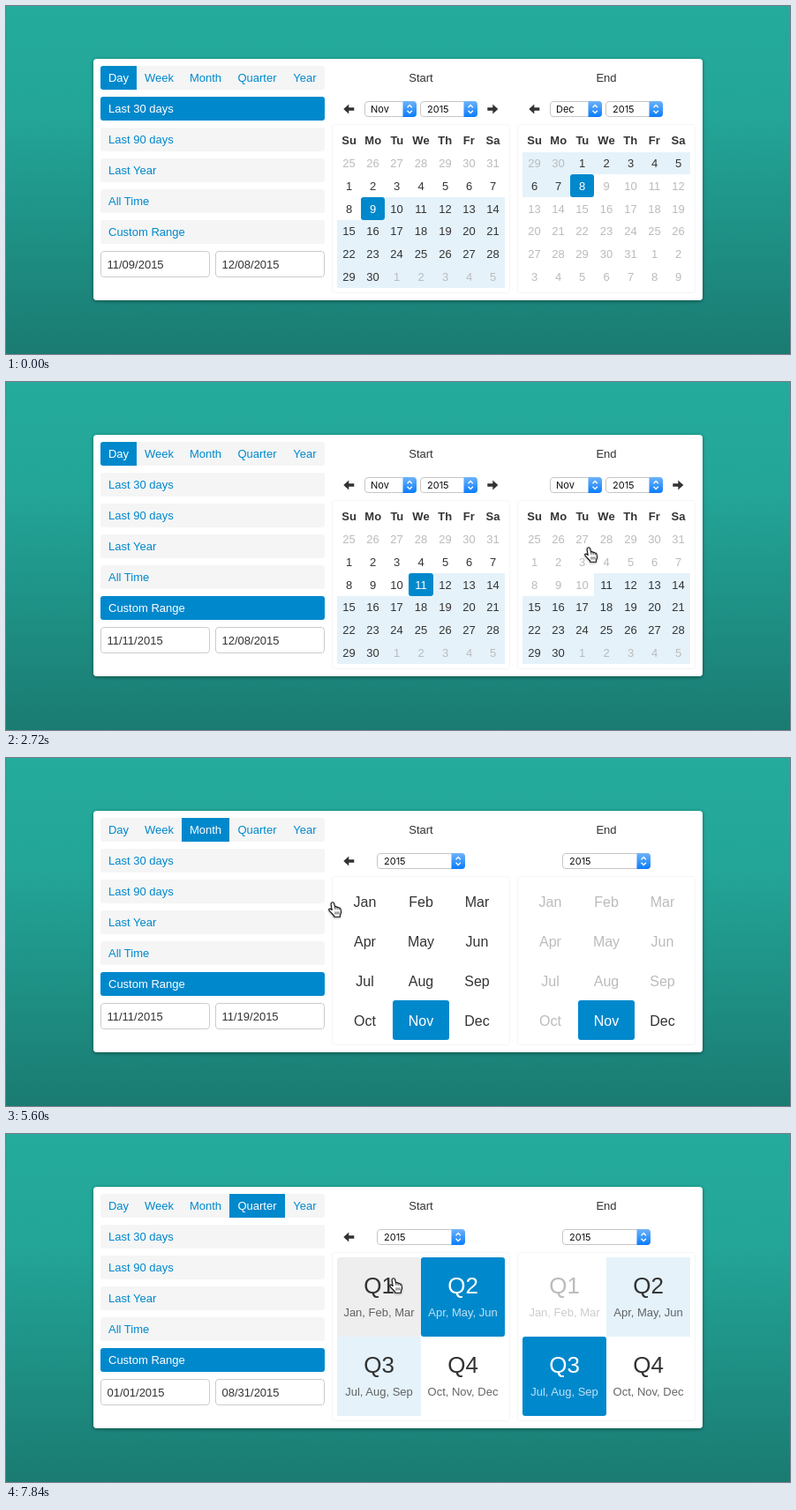
An HTML page that plays this animation: 888x395 px, repeating every 8000 ms.

```html
<!DOCTYPE html>
<html>
<head>
<meta charset="utf-8">
<style>
html, body { margin: 0; width: 100%; height: 100%; overflow: hidden; background: #1f9185; }
svg { display: block; width: 888px; height: 395px; font: 13px "Liberation Sans", Arial, sans-serif; }
.sel { font: 11px Inter, sans-serif; }
</style>
</head>
<body>
<svg viewBox="0 0 888 395">
  <defs>
    <linearGradient id="bg" x1="0" y1="0" x2="0" y2="1">
      <stop offset="0" stop-color="#24ab9c"/>
      <stop offset=".3" stop-color="#23a698"/>
      <stop offset="1" stop-color="#1a7b72"/>
    </linearGradient>
    <linearGradient id="knob" x1="0" y1="0" x2="0" y2="1">
      <stop offset="0" stop-color="#6db3fa"/>
      <stop offset="1" stop-color="#0a7cfb"/>
    </linearGradient>
    <clipPath id="tabs"><rect x="107" y="68" width="254" height="27" rx="3"/></clipPath>
    <filter id="shadow" x="-5%" y="-5%" width="110%" height="115%">
      <feDropShadow dx="0" dy="1" stdDeviation="2" flood-opacity=".4"/>
    </filter>
    <filter id="lift" x="-30%" y="-30%" width="170%" height="170%">
      <feDropShadow dx="0" dy="1" stdDeviation=".8" flood-opacity=".35"/>
    </filter>
  </defs>
  <rect width="888" height="395" fill="url(#bg)"/>
  <rect x="99" y="60" width="690" height="274" rx="4" fill="#fff" filter="url(#shadow)"/>
  <g id="ui"></g>
  <g id="hand" filter="url(#lift)">
    <path d="M3.6 1.4Q5.4 0 6.5 1.9L7.6 6Q9 5.2 9.9 6.4Q11.2 5.8 12 7Q13.6 6.7 14 8.3L14.5 11.5Q14.6 13.5 13.4 15.2V17.3H6.6V16L2.2 11.4Q.1 9 .9 8.4Q2.3 7.6 4.2 9.5L3.1 3Q3 2 3.6 1.4Z"
      fill="#fff" stroke="#111" stroke-width="1.1" stroke-linejoin="round"/>
    <path d="M7.6 6L8 9M9.9 6.6L10.3 9M12 7.2L12.4 9.3M8 11.4V14.5M10 11.4V14.5M12 11.4V14.5" fill="none" stroke="#222" stroke-width=".8"/>
  </g>
</svg>
<script>
const STEP = 160, STEPS = 50;
const BLUE = '#08c', LIGHT = '#e5f2fa', GREY = '#f5f5f5', HOVER = '#eee', INK = '#333', DIM = '#bbb';
const MONTHS = 'Jan Feb Mar Apr May Jun Jul Aug Sep Oct Nov Dec'.split(' ');
const TABS = ['Day', 'Week', 'Month', 'Quarter', 'Year'];
const TAB_X = [107, 148, 199, 253, 316, 361];
const PRESETS = ['Last 30 days', 'Last 90 days', 'Last Year', 'All Time', 'Custom Range'];
const LEFT = [375, 585];
const TODAY = 37;                       // days counted from 1 Nov 2015
// pointer path: step, x, y of the fingertip
const PATH = [
  [2, 508, 386], [4, 491, 312], [6, 474, 246], [8, 469, 232], [9, 469, 231],
  [10, 498, 214], [11, 555, 163], [12, 594, 118], [13, 604, 109], [15, 604, 109],
  [16, 618, 132], [17, 660, 188], [18, 697, 238], [19, 706, 248], [20, 707, 249],
  [21, 648, 236], [22, 209, 104], [23, 196, 89], [24, 193, 87], [29, 193, 87],
  [30, 205, 85], [31, 214, 83], [33, 214, 83], [34, 256, 108], [35, 370, 164],
  [36, 455, 199], [37, 468, 204], [38, 502, 216], [39, 559, 233], [40, 636, 245],
  [41, 674, 249], [42, 682, 250], [43, 683, 250], [44, 610, 216], [45, 390, 116],
  [46, 301, 79], [47, 302, 80], [48, 372, 124], [49, 439, 164]
];

const ui = document.getElementById('ui'), hand = document.getElementById('hand');

const box = (x, y, w, h, fill, more = '') =>
  `<rect x="${x}" y="${y}" width="${w}" height="${h}" fill="${fill}" ${more}/>`;
const text = (x, y, s, fill = INK, more = '') => `<text x="${x}" y="${y}" fill="${fill}" ${more}>${s}</text>`;
const mid = (x, y, s, fill, more = '') => text(x, y, s, fill, 'text-anchor="middle" ' + more);
const round = 'rx="3"';
const inside = (p, x, y, w, h) => p && p.x >= x && p.x < x + w && p.y >= y && p.y < y + h;
const day = i => new Date(2015, 10, 1 + i);
const pad = n => String(n).padStart(2, '0');
const format = d => `${pad(d.getMonth() + 1)}/${pad(d.getDate())}/${d.getFullYear()}`;

function pointer(step) {
  if (step < PATH[0][0]) return null;
  const n = PATH.findIndex(p => p[0] >= step), b = PATH[n], a = PATH[Math.max(0, n - 1)];
  const k = b === a ? 0 : (step - a[0]) / (b[0] - a[0]);
  return { x: a[1] + (b[1] - a[1]) * k, y: a[2] + (b[2] - a[2]) * k };
}

function stateAt(step) {
  const mode = step < 26 ? 0 : step < 33 ? 1 : step < 47 ? 2 : 3;
  return {
    mode,
    preset: step < 9 ? 0 : 4,
    view: [10, step < 15 ? 11 : 10],
    range: mode < 2
      ? [step < 9 ? 8 : 10, step < 20 ? TODAY : 18]
      : [step < 37 ? 10 : 4, step < 43 ? 10 : 7],
    dates: [
      step < 9 ? '11/09/2015' : step < 37 ? '11/11/2015' : '05/01/2015',
      step < 20 ? '12/08/2015' : step < 43 ? '11/19/2015' : '08/31/2015'
    ]
  };
}

function select(x, w, label, pad) {
  const k = x + w - 15.5, c = k + 7.7;
  return box(x + .5, 108.5, w - 1, 17, '#fff', 'rx="3.5" stroke="#c6c6c6"') +
    `<path d="M${k} 108H${x + w - 4}q4 0 4 4v10q0 4-4 4H${k}z" fill="url(#knob)"/>` +
    `<path d="M${c - 2.7} 115.3l2.7-2.8 2.7 2.8M${c - 2.7} 118.7l2.7 2.8 2.7-2.8" fill="none" stroke="#fff" stroke-width="1.3"/>` +
    text(x + pad, 121, label, '#111', 'class="sel"');
}

function arrow(x, dir, p) {
  const c = x + 13.3;
  return (inside(p, x, 103, 28, 27) ? box(x, 103, 28, 27, '#f2f2f2', round) : '') +
    `<path d="M${c - 6 * dir} 117l${6 * dir}-5.5v3.7h${6 * dir}v3.6h${-6 * dir}v3.7z" fill="${INK}"/>`;
}

function dayCells(side, s) {
  const first = s.view[side] === 10 ? -7 : 28;
  const unit = i => s.mode ? Math.floor(i / 7) : i;
  const [a, b] = s.range.map(unit);
  return Array.from({ length: 42 }, (_, n) => {
    const i = first + n, u = unit(i), c = n % 7, r = 1 + Math.floor(n / 7);
    const x = Math.round(c * 190 / 7), y = Math.round(140 + r * 180 / 7);
    const off = day(i).getMonth() !== s.view[side] || i > TODAY || (side && u < a);
    return {
      x, y, w: Math.round((c + 1) * 190 / 7) - x, h: Math.round(140 + (r + 1) * 180 / 7) - y,
      on: u === (side ? b : a) && !off, near: u >= a && u <= b, off, row: s.mode ? r : 0, col: c, unit: u,
      from: day(s.mode ? u * 7 : i), to: day(s.mode ? u * 7 + 6 : i),
      draw: (cx, fill) => mid(cx, Math.round(140 + (r + .5) * 180 / 7 + 4.6), day(i).getDate(), fill)
    };
  });
}

function spanCells(side, s) {
  const quarter = s.mode === 3, cols = quarter ? 2 : 3, len = quarter ? 3 : 1;
  const h = quarter ? 90 : 45, [a, b] = s.range.map(m => Math.floor(m / len));
  return Array.from({ length: 12 / len }, (_, n) => {
    const c = n % cols, y = 140 + Math.floor(n / cols) * h, x = Math.round(c * 190 / cols);
    return {
      x, y, w: Math.round((c + 1) * 190 / cols) - x, h, unit: n,
      on: n === (side ? b : a), near: n >= a && n <= b, off: side && n < a,
      from: new Date(2015, n * len, 1), to: new Date(2015, (n + 1) * len, 0),
      draw: (cx, fill) => quarter
        ? mid(cx, y + 41, 'Q' + (n + 1), fill, 'font-size="26"') +
          mid(cx, y + 67, MONTHS.slice(n * 3, n * 3 + 3).join(', '), fill, 'opacity=".75"')
        : mid(cx, y + 29, MONTHS[n], fill, 'font-size="16"')
    };
  });
}

function panel(side, s, p) {
  const left = LEFT[side], days = s.mode < 2;
  let out = mid(left + 95, 86, side ? 'End' : 'Start', INK) +
    box(left - 5.5, 134.5, 201, 191, '#fff', 'rx="3" stroke="#f5f5f5"');
  if (days) {
    const nov = s.view[side] === 10;
    if (!side || !nov) out += arrow(left, 1, p);
    if (nov) out += arrow(left + 163, -1, p);
    out += select(left + 31, 59, MONTHS[s.view[side]], 7) + select(left + 94, 65, '2015', 8);
    'Su Mo Tu We Th Fr Sa'.split(' ').forEach((d, i) =>
      out += mid(left + (i + .5) * 190 / 7, 157, d, INK, 'font-weight="bold"'));
  } else {
    if (!side) out += arrow(left, 1, p);
    out += select(left + 45, 100, '2015', 8);
  }
  const cells = (days ? dayCells : spanCells)(side, s);
  const hit = cells.find(c => !c.off && inside(p, left + c.x, c.y, c.w, c.h));
  if (hit) s.dates[side] = format(side ? hit.to : hit.from);
  let labels = '';
  for (const c of cells) {
    const hot = hit && hit.unit === c.unit && !c.off;
    const fill = c.on ? BLUE : hot ? HOVER : c.near ? LIGHT : '';
    if (fill && c.row && c.on) {
      if (!c.col) out += box(left, c.y, 190, c.h, fill, round);
    } else if (fill) {
      out += box(left + c.x, c.y, c.w, c.h, fill, c.on || hot && s.mode !== 2 ? round : '');
    }
    labels += c.draw(left + c.x + c.w / 2, c.on ? '#fff' : c.off ? DIM : INK);
  }
  return out + labels;
}

function sidebar(s, p) {
  let out = box(107, 68, 254, 27, GREY, round), marks = '';
  TABS.forEach((t, i) => {
    const x = TAB_X[i], w = TAB_X[i + 1] - x;
    const on = i === s.mode || inside(p, x, 68, w, 27);
    if (on) marks += box(x, 68, w, 27, BLUE);
  });
  out += `<g clip-path="url(#tabs)">${marks}</g>`;
  TABS.forEach((t, i) => {
    const x = TAB_X[i], w = TAB_X[i + 1] - x;
    out += mid(x + w / 2, 86, t, i === s.mode || inside(p, x, 68, w, 27) ? '#fff' : BLUE);
  });
  PRESETS.forEach((t, i) => {
    const y = 103 + i * 35, on = i === s.preset || inside(p, 107, y, 254, 27);
    out += box(107, y, 254, 27, on ? BLUE : GREY, round) + text(116, y + 18, t, on ? '#fff' : BLUE);
  });
  s.dates.forEach((d, i) => {
    const x = 107 + i * 130;
    out += box(x + .5, 278.5, 123, 29, '#fff', 'rx="3.5" stroke="#ccc"') + text(x + 7.5, 298, d);
  });
  return out;
}

let shown = -1;
function render(t) {
  const step = Math.floor(t / STEP) % STEPS;
  if (step !== shown) {
    shown = step;
    const s = stateAt(step), p = pointer(step);
    const panels = panel(0, s, p) + panel(1, s, p);
    ui.innerHTML = sidebar(s, p) + panels;
    hand.setAttribute('visibility', p ? 'visible' : 'hidden');
    if (p) hand.setAttribute('transform', `translate(${p.x - 5} ${p.y - 1})`);
  }
}

const start = performance.now();
function loop(now) {
  render(Math.max(0, now - start));
  requestAnimationFrame(loop);
}
render(0);
requestAnimationFrame(loop);
</script>
</body>
</html>
```
